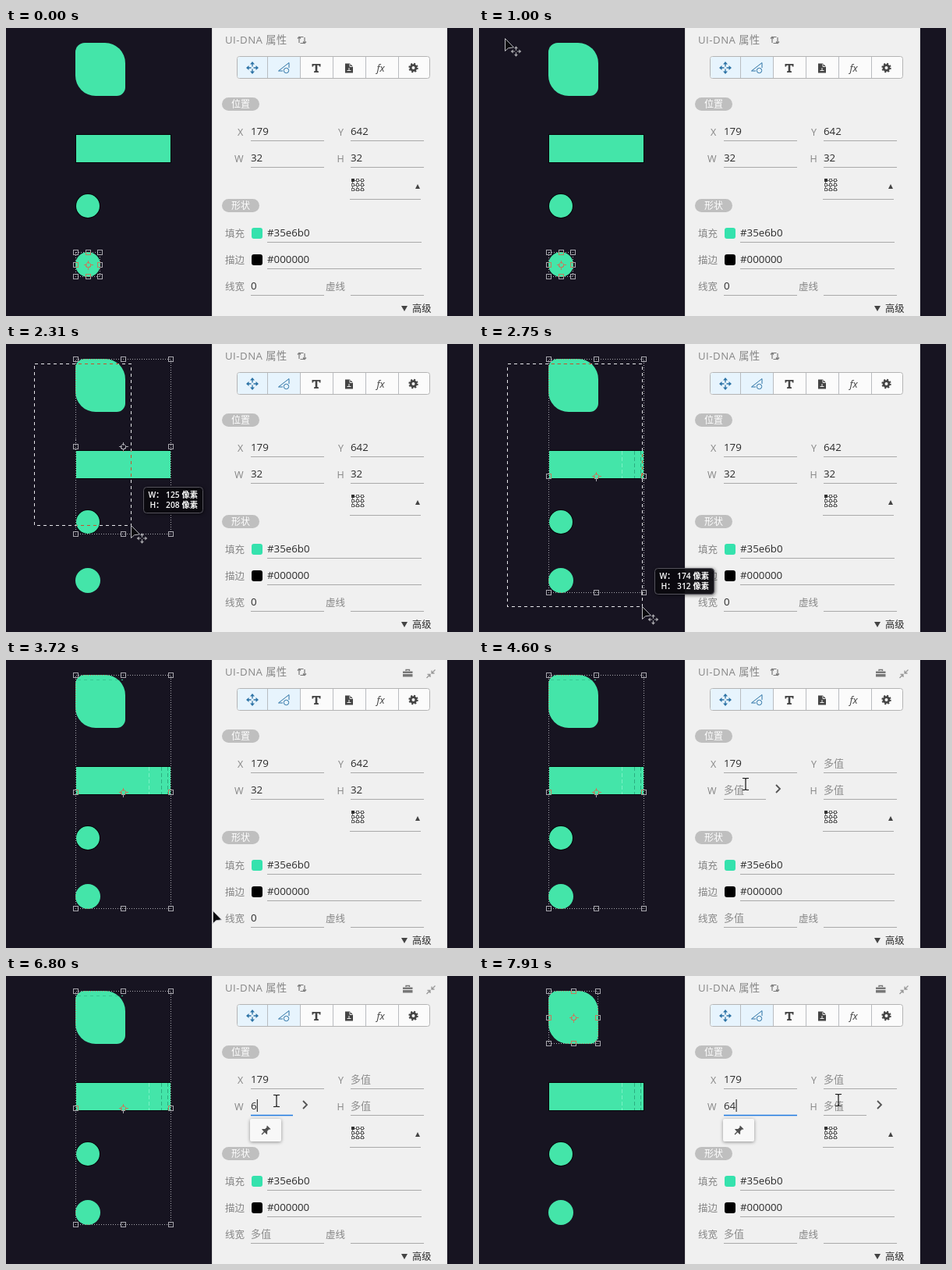
Write an HTML page that moves like this. It is 599 by 369 pixels and loops after 8000 ms.

```html
<!DOCTYPE html>
<html lang="zh-CN">
<head>
<meta charset="utf-8">
<title>UI-DNA 属性</title>
<style>
html, body { margin: 0; width: 100%; height: 100%; overflow: hidden; background: #171421; }
svg { display: block; }
text { font: 13.3px "Open Sans", "Noto Sans CJK SC", "Noto Sans CJK", sans-serif; fill: #2b2b2b; }
.label { font-size: 12.5px; fill: #858585; }
.title { font-size: 13.2px; letter-spacing: .5px; }
.many { font-size: 13px; fill: #8c8c8c; }
.pill { font-size: 12px; fill: #fff; text-anchor: middle; }
.tip { font-size: 10.3px; font-weight: 600; fill: #fff; text-anchor: end; }
.line { fill: none; stroke: #a9a9a9; }
.thin { fill: none; stroke: currentColor; shape-rendering: crispEdges; }
.rim { stroke: #050509; stroke-width: 2; paint-order: stroke; }
</style>
</head>
<body>
<svg width="599" height="369" viewBox="0 0 599 369">
  <defs>
    <path id="blob" d="M101 19H127A26 26 0 0 1 153 45V76A11 11 0 0 1 142 87H115A26 26 0 0 1 89 61V31A12 12 0 0 1 101 19Z"/>
    <rect id="bar" x="90" y="137" width="121" height="35"/>
    <circle id="dot1" cx="105" cy="228" r="15"/>
    <circle id="dot2" cx="105" cy="303" r="16"/>
    <clipPath id="onShapes">
      <use href="#blob"/><use href="#bar"/><use href="#dot1"/><use href="#dot2"/>
    </clipPath>
    <g id="move4">
      <path d="M-6 0H6M0 -6V6" fill="none" stroke="currentColor" stroke-width="1.3" stroke-dasharray="4.5 3"/>
      <path d="M0 -8L3 -4.5H-3ZM0 8L3 4.5H-3ZM-8 0L-4.5 3V-3ZM8 0L4.5 3V-3Z" fill="currentColor"/>
    </g>
    <path id="chevron" d="M0 -5L5 0L0 5" fill="none" stroke="#555" stroke-width="1.8"/>
  </defs>

  <rect width="599" height="369" fill="#171421"/>
  <g fill="#44e5a9">
    <use href="#blob"/>
    <use href="#bar" class="rim"/>
    <use href="#dot1" class="rim"/>
    <use href="#dot2"/>
  </g>
  <g id="traces" fill="none">
    <path d="M183.500 137V172" stroke="#7af0c4" stroke-dasharray="5 3"/>
    <path d="M199.500 137V172M207.500 137V172" stroke="#2cae80" stroke-dasharray="5 3"/>
    <path id="topTrace" d="M92 25.500H150" stroke="#36c792" stroke-dasharray="4 4"/>
  </g>

  <g id="panel">
    <rect x="264" width="302" height="369" fill="#f0f0f0"/>
    <path d="M264.500 0V369M565.500 0V369" stroke="#dcdcdc"/>
    <text class="label title" x="281" y="20">UI-DNA 属性</text>
    <g fill="none" stroke="#777" stroke-width="1.2">
      <path d="M376 19V13.500Q376 11.500 378 11.500H381.500M383 12V17.500Q383 19.500 381 19.500H377.500"/>
      <path d="M374 13.500L376 11.300L378 13.500M381 17.500L383 19.700L385 17.500"/>
    </g>
    <g id="tools" fill="#777">
      <path d="M509 14.500H521.500V17H509ZM509 18H521.500V21.500H509Z"/>
      <path d="M513 14V12.500H517.500V14" fill="none" stroke="#777" stroke-width="1.3"/>
      <path d="M550.500 12.500L546 17M546 13.500V17H549.500M539.500 23L544 18.500M540.500 18.500H544V22" fill="none" stroke="#999" stroke-width="1.3"/>
    </g>

    <rect x="296.500" y="36.500" width="247" height="28" rx="3" fill="#fbfbfb" stroke="#b4b4b4"/>
    <path d="M299.500 37H377V64H299.500Q297 64 297 61.500V39.500Q297 37 299.500 37Z" fill="#e7f4fd"/>
    <path d="M335.500 37V64M377.500 37V64M419.500 37V64M461.500 37V64M503.500 37V64" stroke="#b9bcc0"/>
    <use href="#move4" x="316" y="51" color="#2d73a6"/>
    <g fill="none" stroke="#2d73a6">
      <path d="M349.500 55L363 44.500V51M349.500 55H355"/>
      <circle cx="359.500" cy="54.500" r="3.200"/>
    </g>
    <path d="M392.500 46H403.500V49.500H402L401.300 47.800H399.300V55L401 55.600V57H395V55.600L396.700 55V47.800H394.700L394 49.500H392.500Z" fill="#444"/>
    <path d="M435 45.500H441L445 49.500V57.500H435Z" fill="#444"/>
    <path d="M441 46V49.500H444.500M437.500 54.500H442.500M440 51V55" fill="none" stroke="#eee"/>
    <text x="475.500" y="55.500" style="font:italic 13px 'Open Sans',sans-serif;fill:#444">fx</text>
    <circle cx="522.500" cy="51" r="3.400" fill="none" stroke="#444" stroke-width="2.800"/>
    <circle cx="522.500" cy="51" r="5.200" fill="none" stroke="#444" stroke-width="2" stroke-dasharray="2.042"/>

    <g fill="#bfbfbf">
      <rect x="277" y="89" width="48" height="17" rx="8.500"/>
      <rect x="277" y="219" width="48" height="17" rx="8.500"/>
    </g>
    <text class="pill" x="301" y="102">位置</text>
    <text class="pill" x="301" y="232">形状</text>

    <text class="label" x="297" y="138">X</text>
    <text class="label" x="426" y="138">Y</text>
    <text class="label" x="293" y="172">W</text>
    <text class="label" x="424.500" y="172">H</text>
    <text x="314" y="136.500">179</text>
    <text id="valY" x="442" y="136.500"></text>
    <text id="valW" x="314" y="170.500"></text>
    <text id="valH" x="442" y="170.500"></text>
    <path class="line" d="M314 144.500H408M442 144.500H536M441 219.500H532M335 274.500H533M335 308.500H533M314 342.500H408M442 342.500H536"/>
    <path class="line" id="lineW"/>
    <path class="line" id="lineH"/>
    <use href="#chevron" id="goW" x="381" y="165"/>
    <use href="#chevron" id="goH" x="511" y="165"/>
    <use href="#chevron" id="goStroke" x="541" y="297"/>
    <path id="caret" stroke="#111"/>

    <g id="anchor" fill="none" stroke="#666"></g>
    <path d="M525 206L528 200L531 206Z" fill="#444"/>

    <text class="label" x="281" y="268">填充</text>
    <rect x="315" y="256" width="14" height="14" rx="3" fill="#35e2ad"/>
    <text x="335" y="266.500">#35e6b0</text>
    <text class="label" x="281" y="302">描边</text>
    <rect x="315" y="290" width="14" height="14" rx="3" fill="#000"/>
    <text x="335" y="300.500">#000000</text>
    <text class="label" x="281" y="336">线宽</text>
    <text id="valL" x="314" y="334.500"></text>
    <text class="label" x="410" y="336">虚线</text>
    <path d="M507 356H515L511 363Z" fill="#444"/>
    <text x="521" y="364" style="font-size:12.3px">高级</text>

    <g id="pin">
      <rect x="313" y="183" width="40" height="29" rx="2" fill="#f8f8f8" style="filter:drop-shadow(0 1px 2px #0006)"/>
      <path d="M-3 -6H3V-4.500H2V-1L4.500 1.500V2.500H.7V7H-.7V2.500H-4.500V1.500L-2 -1V-4.500H-3Z" transform="translate(333 198) rotate(45)" fill="#505050"/>
    </g>
  </g>

  <g color="#e6e6ea">
    <g id="overlay">
      <path id="bounds" class="thin" stroke-dasharray="1 2" opacity=".7"/>
      <path id="handles" class="thin" opacity=".7"/>
      <path id="marquee" class="thin" stroke-dasharray="4 4"/>
    </g>
  </g>
  <use href="#overlay" color="#c8502c" clip-path="url(#onShapes)"/>

  <g id="tip" style="filter:drop-shadow(1px 1px 2px #0009)">
    <rect x=".5" y=".5" width="76" height="33" rx="4" fill="#0c0b10" fill-opacity=".9" stroke="#55535c"/>
    <text id="tipW" class="tip" x="70" y="14"></text>
    <text id="tipH" class="tip" x="70" y="27"></text>
  </g>

  <g id="pointer">
    <g id="arrow">
      <path d="M.5 .5V16.500L4.500 12.800L11.500 11.800Z" fill="#0a0a0e" stroke="#bdbdc2"/>
      <use id="cross" href="#move4" transform="translate(14.500 17) scale(.85)" color="#a8a8ac"/>
    </g>
    <path id="beam" d="M-4 -7.500H-1L0 -6.500L1 -7.500H4M0 -7V7M-4 7.500H-1L0 6.500L1 7.500H4" fill="none" stroke="#111" stroke-width="1.2"/>
  </g>
</svg>
<script>
const LOOP = 8000, OX = 36, OY = 25;
const $ = id => document.getElementById(id);
const show = (id, on) => $(id).style.display = on ? '' : 'none';
const attr = (id, name, value) => $(id).setAttribute(name, value);

// left, top, right, bottom
const shapes = [[89, 19, 152, 86], [89, 137, 211, 172], [90, 213, 120, 243], [89, 287, 120, 318]];

// first step, last step, number of steps, x, y
const moves = [
  [100, 100, 1, 300, 286], [220, 220, 1, 5, 120], [330, 330, 1, 66, 13],
  [550, 770, 3, 30, 6], [880, 1080, 3, 34, 16],
  [1320, 1430, 2, 27, 19], [1540, 1650, 2, 36, 25],
  [1750, 1850, 2, 95, 90], [1980, 2090, 2, 141, 182],
  [2190, 2310, 2, 160, 232], [2410, 2750, 4, 209, 336],
  [2850, 2850, 1, 214, 338], [2960, 2960, 1, 206, 331],
  [3620, 3930, 4, 440, 292], [4070, 4500, 5, 352, 180],
  [4600, 4600, 1, 342, 159], [4710, 4820, 2, 347, 160],
  [5590, 5590, 1, 350, 168], [6800, 6800, 1, 347, 160],
  [7130, 7910, 8, 461, 159]
];

function pointerAt(t) {
  let x = 300, y = 286;
  for (const [from, to, n, ex, ey] of moves) {
    if (t < from) break;
    const gap = n > 1 ? (to - from) / (n - 1) : 1;
    const k = Math.min(1, (Math.floor((t - from) / gap + .02) + 1) / n);
    x += (ex - x) * k;
    y += (ey - y) * k;
    if (k < 1) break;
  }
  return [Math.round(x), Math.round(y)];
}

const union = list => list.reduce((a, b) =>
  [Math.min(a[0], b[0]), Math.min(a[1], b[1]), Math.max(a[2], b[2]), Math.max(a[3], b[3])]);
const square = (x, y) => `M${x - 3} ${y - 3}h6v6h-6z`;

function drawBounds([l, t, r, b]) {
  l += .5; t += .5; r += .5; b += .5;
  const cx = Math.floor((l + r) / 2) + .5, cy = Math.floor((t + b) / 2) + .5;
  attr('bounds', 'd', `M${l} ${t}H${r}V${b}H${l}Z`);
  let d = `M${cx - 3} ${cy}a3 3 0 1 0 6 0a3 3 0 1 0 -6 0` +
    `M${cx - 6} ${cy}h4m4 0h4M${cx} ${cy - 6}v4m0 4v4`;
  for (const x of [l, cx, r])
    for (const y of [t, cy, b])
      if (x !== cx || y !== cy) d += square(x, y);
  attr('handles', 'd', d);
}

function setValue(id, text, many) {
  $(id).textContent = many ? '多值' : text;
  $(id).setAttribute('class', many ? 'many' : '');
}

function render(t) {
  const [x, y] = pointerAt(t);
  const dragging = t >= 1980 && t < 2960;
  const inPanel = t >= 100 && x > 264;
  const many = t >= 3730, focus = t >= 4920;
  const typed = t >= 6900 ? '64' : t >= 6460 ? '6' : '';

  let box = shapes[3];
  if (dragging) box = union(shapes.filter(s => s[0] < x && s[1] < y));
  else if (t >= 7680) box = shapes[0];
  else if (t >= 2960) box = union(shapes);
  drawBounds(box);

  show('marquee', dragging);
  show('tip', dragging);
  if (dragging) {
    attr('marquee', 'd', `M${OX + .5} ${OY + .5}H${x + .5}V${y + .5}H${OX + .5}Z`);
    attr('tip', 'transform', `translate(${x + 16} ${y - 49})`);
    $('tipW').textContent = `W： ${x - OX + 1} 像素`;
    $('tipH').textContent = `H： ${y - OY + 1} 像素`;
  }
  show('traces', t >= 2750);
  show('topTrace', t < 7680);

  const row = y > 145 && y < 182;
  const overW = inPanel && row && x > 305 && x < 410;
  const overH = inPanel && row && x > 424 && x < 538;
  show('tools', inPanel);
  show('goW', overW);
  show('goH', overH);
  show('goStroke', inPanel && x > 335 && y > 280 && y < 309);
  setValue('valY', '642', many);
  setValue('valW', typed || '32', many && !typed);
  setValue('valH', '32', many);
  setValue('valL', '0', many);
  attr('lineW', 'd', `M314 178.500H${overW ? 368 : 408}`);
  attr('lineH', 'd', `M442 178.500H${overH ? 497 : 536}`);
  $('lineW').style.stroke = focus ? '#1f7ae0' : '';
  $('lineW').style.strokeWidth = focus ? 1.6 : 1;
  show('pin', focus);
  show('caret', focus && (t < 5810 || t >= 6240));
  attr('caret', 'd', `M${314.5 + typed.length * 7.8} 158V174`);

  const beam = inPanel && x > 312;
  const hidden = t < 100 || (t >= 6460 && t < 6800) || (t >= 6900 && t < 7130);
  show('pointer', !hidden);
  show('beam', beam);
  show('arrow', !beam);
  show('cross', !inPanel);
  attr('pointer', 'transform', `translate(${x} ${y})`);
}

// 3 by 3 reference point picker, the first cell chosen
let cells = '<path d="M447 195.500H460M447 201.500H460M447 207.500H460M444.500 197V208M450.500 197V208M456.500 197V208" stroke-dasharray="2 4"/>';
for (let i = 0; i < 9; i++) {
  const gx = 443.5 + i % 3 * 6, gy = 193.5 + Math.floor(i / 3) * 6;
  cells += `<rect x="${gx}" y="${gy}" width="3" height="3" ${i ? '' : 'fill="#333" stroke="#333"'}/>`;
}
$('anchor').innerHTML = cells;

const start = performance.now();
function tick() {
  render((performance.now() - start) % LOOP);
  requestAnimationFrame(tick);
}
tick();
</script>
</body>
</html>
```
